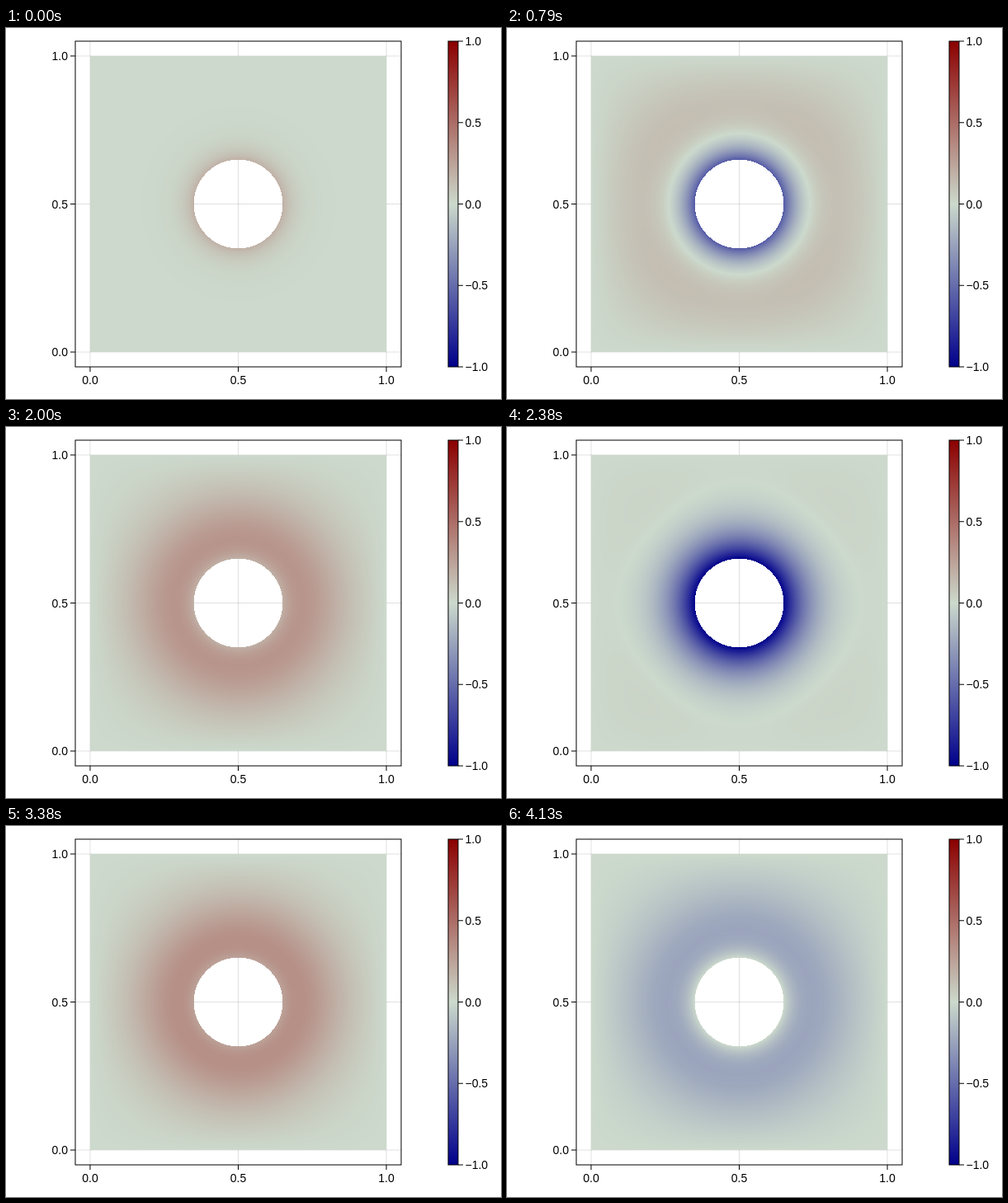
An HTML page with a canvas for the animation above (4.17 s loop, 600x450 px).

```html
<!DOCTYPE html>
<html lang="en">
<head>
<meta charset="utf-8">
<title>Pulsing heat around a hole</title>
<style>
  html, body { margin: 0; width: 100%; height: 100%; overflow: hidden; background: #fff; }
  svg, canvas { position: absolute; display: block; }
  svg { left: 0; top: 0; }
  canvas { left: 102px; top: 34px; }
  text { font: 14px "Liberation Sans", Arial, sans-serif; fill: #000; }
  .line { fill: none; stroke: #000; stroke-width: 1; }
  .grid { stroke: #000; stroke-opacity: .12; }
</style>
</head>
<body>
<svg id="plot" width="600" height="450" viewBox="0 0 600 450">
  <defs>
    <linearGradient id="ramp" x1="0" y1="0" x2="0" y2="1">
      <stop offset="0" stop-color="#8b0000"/>
      <stop offset=".5" stop-color="#ccd9cc"/>
      <stop offset="1" stop-color="#00008b"/>
    </linearGradient>
  </defs>
  <rect x="536" y="16" width="12" height="395" fill="url(#ramp)"/>
  <rect class="line" x="536" y="16" width="12" height="395"/>
  <rect class="line" x="84" y="16" width="395" height="395"/>
</svg>
<canvas id="field" width="359" height="359"></canvas>
<script>
// Axes: 359.09 px per unit, centred on (281.5, 213.5)
const SCALE = 395 / 1.1;
const plot = document.getElementById('plot');

function add(tag, attrs, text) {
  const el = document.createElementNS('http://www.w3.org/2000/svg', tag);
  for (const key in attrs) el.setAttribute(key, attrs[key]);
  if (text) el.textContent = text;
  plot.appendChild(el);
}
const line = (x1, y1, x2, y2, cls) => add('line', { x1, y1, x2, y2, class: cls });
const label = (x, y, anchor, text) => add('text', { x, y, 'text-anchor': anchor }, text);

for (const v of [0, 0.5, 1]) {
  const x = 281.5 + (v - 0.5) * SCALE, y = 213.5 - (v - 0.5) * SCALE;
  line(x, 16, x, 411, 'grid');
  line(84, y, 479, y, 'grid');
  line(x, 411, x, 417, 'line');
  line(78, y, 84, y, 'line');
  label(x, 432.3, 'middle', v.toFixed(1));
  label(75, y + 5, 'end', v.toFixed(1));
}
for (let v = -1; v <= 1; v += 0.5) {
  const y = 213.5 - v * 197.5;
  line(548, y, 554, y, 'line');
  label(556.5, y + 5, 'start', v.toFixed(1).replace('-', '\u2212'));
}

// Heat equation on one quarter of the plate: zero outer edge, oscillating hole edge
const N = 90, W = N + 1, H = 0.5 / N;
const HOLE = 0.15 / H;                 // hole radius in cells
const FRAMES = 100, DT = 0.01, DIFFUSION = 0.2;
const RATE = DIFFUSION * DT / (H * H);
const SWEEPS = 50, RELAX = 1.82;

// Weights towards and away from the centre; the inner gap is cut at the hole
function weights(p, q) {
  const edge = Math.sqrt(Math.max(0, HOLE * HOLE - q * q));
  const gap = p ? Math.min(1, p - edge) : 1;
  return [2 * RATE / (gap * (1 + gap)), 2 * RATE / (1 + gap)];
}

const nodes = [], hole = [];
for (let j = 0; j < N; j++) {
  for (let i = 0; i < N; i++) {
    const at = j * W + i, r = Math.hypot(i, j);
    if (r <= HOLE) {
      hole.push({ at, i, j, r });
      continue;
    }
    const [wl, wr] = weights(i, j), [wd, wu] = weights(j, i);
    nodes.push({
      at, wl, wr, wd, wu,
      left: i ? at - 1 : at + 1,
      down: j ? at - W : at + W,
      scale: 1 / (1 + wl + wr + wd + wu)
    });
  }
}

function sample(f, x, y) {
  const i = Math.min(N - 1, Math.floor(x)), j = Math.min(N - 1, Math.floor(y));
  const fx = x - i, fy = y - j, k = j * W + i;
  return (f[k] * (1 - fx) + f[k + 1] * fx) * (1 - fy)
       + (f[k + W] * (1 - fx) + f[k + W + 1] * fx) * fy;
}

function solve() {
  const u = new Float64Array(W * W), fields = [];
  for (let n = 1; n <= FRAMES; n++) {
    const old = u.slice(), g = Math.sin(6 * Math.PI * n * DT);
    for (const c of hole) u[c.at] = g;
    for (let s = 0; s < SWEEPS; s++) {
      for (const c of nodes) {
        const k = c.at;
        const next = (old[k] + c.wl * u[c.left] + c.wr * u[k + 1]
                    + c.wd * u[c.down] + c.wu * u[k + W]) * c.scale;
        u[k] += RELAX * (next - u[k]);
      }
    }
    // Extend the slope a little into the hole for clean interpolation
    const f = Float32Array.from(u);
    for (const c of hole) {
      if (c.r < HOLE - 1.6) continue;
      const m = (HOLE + 1.5) / c.r;
      f[c.at] = g + (sample(u, c.i * m, c.j * m) - g) * (c.r - HOLE) / 1.5;
    }
    fields.push(f);
  }
  return fields;
}

const fields = solve();
const ctx = document.getElementById('field').getContext('2d');
const SIZE = 359, MID = 179, CELL = SCALE * H;
const image = ctx.createImageData(SIZE, SIZE);

function paint(f) {
  const px = image.data;
  for (let y = 0; y <= MID; y++) {
    for (let x = 0; x <= MID; x++) {
      const gx = x / CELL, gy = y / CELL;
      if (Math.hypot(gx, gy) < HOLE) continue;
      const v = Math.max(-1, Math.min(1, sample(f, gx, gy)));
      const m = Math.abs(v);
      const r = 204 + ((v > 0 ? 139 : 0) - 204) * m;
      const g = 217 * (1 - m);
      const b = 204 + ((v < 0 ? 139 : 0) - 204) * m;
      for (const row of [MID - y, MID + y]) {
        for (const col of [MID - x, MID + x]) {
          const o = (row * SIZE + col) * 4;
          px[o] = r;
          px[o + 1] = g;
          px[o + 2] = b;
          px[o + 3] = 255;
        }
      }
    }
  }
  ctx.putImageData(image, 0, 0);
}

// 24 frames a second on a 10 ms clock; a few frames stay twice as long
const LOOP = 4170, HELD = [26, 58, 91];
const startOf = k => Math.round(k * 100 / 24) * 10;
let shown = -1;

function tick() {
  const t = performance.now() % LOOP;
  let k = FRAMES - 1;
  while (startOf(k) > t) k--;
  if (HELD.includes(k)) k--;
  if (k !== shown) paint(fields[shown = k]);
  requestAnimationFrame(tick);
}
tick();
</script>
</body>
</html>
```
